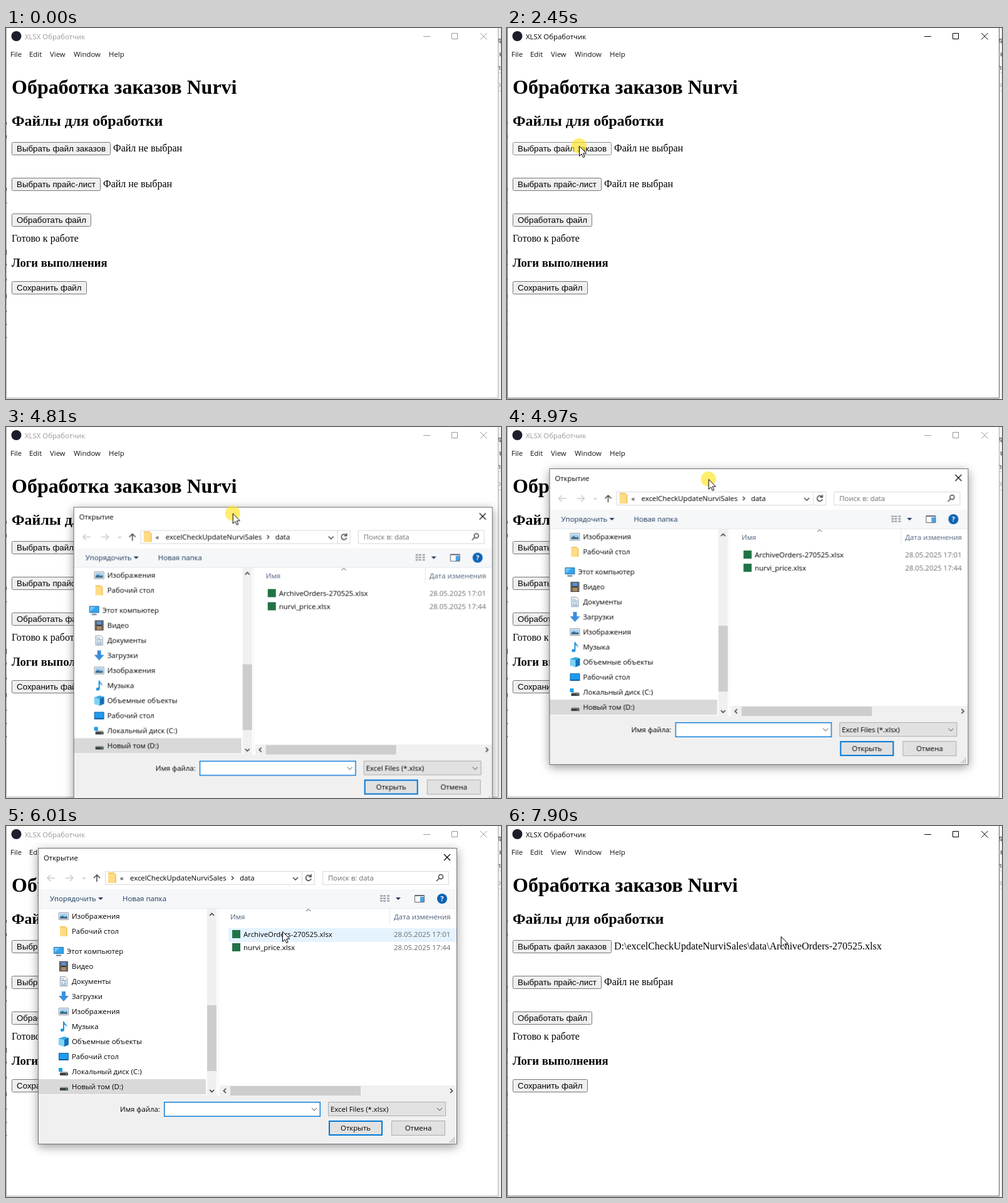
An HTML page for the animation above (8000 ms loop, 790x592 px).

```html
<!DOCTYPE html>
<html lang="ru">
<head>
<meta charset="utf-8">
<title>XLSX Обработчик</title>
<style>
html, body { margin: 0; width: 100%; height: 100%; overflow: hidden; background: #fff; }
svg { display: block; }
text { white-space: pre; }
.ui { font: 11.4px "Open Sans", "Noto Sans", sans-serif; }
.page { font: 16px "Liberation Serif", "Times New Roman", serif; }
.page .h1 { font-size: 32px; font-weight: bold; }
.page .h2 { font-size: 24px; font-weight: bold; }
.page .h3 { font-size: 18.72px; font-weight: bold; }
.btn text { font: 13.333px "Liberation Sans", Arial, sans-serif; }
.btn rect { fill: #efefef; stroke: #767676; }
.line { fill: none; stroke: #444; }
.mid { text-anchor: middle; }
.muted { fill: #6d6d6d; }

/* 8 s loop: 1% = 80 ms */
.title, .border, .hover, .chosen, .unchosen, .press, .row, .field, .name, .caret { animation: 8s step-end infinite; }
.title { animation-name: title; }
.border { animation-name: border; }
.btn .hover { animation-name: hover; }
.unchosen { animation-name: unchosen; }
.chosen { animation-name: chosen; }
.press { animation-name: press; }
.row { animation-name: row; }
.field { animation-name: field; }
.name { animation-name: name; }
.caret { animation-name: caret; }
.cursor { animation: cursor 8s linear infinite; }
.dialog { animation: drag 8s linear infinite; }
.fade { animation: close 8s linear infinite; transform-origin: 334px 236px; }

@keyframes title {
  0%, 32.125% { color: #999; }
  30.6%, 96.25%, 100% { color: #000; }
}
@keyframes border {
  0%, 32.125% { stroke: #aaa; }
  30.6%, 96.25%, 100% { stroke: #666; }
}
@keyframes hover {
  0%, 39.875%, 100% { fill: #efefef; stroke: #767676; }
  18.25%, 32.125% { fill: #e5e5e5; stroke: #4f4f4f; }
  30.6% { fill: #f5f5f5; stroke: #8d8d8d; }
}
@keyframes unchosen { 0% { opacity: 1; } 97.75%, 100% { opacity: 0; } }
@keyframes chosen { 0% { opacity: 0; } 97.75%, 100% { opacity: 1; } }
@keyframes press {
  0%, 32.125%, 68.5%, 82.25%, 84.875%, 100% { opacity: 0; }
  30.6%, 55.45%, 80.75%, 83.375% { opacity: .65; }
}
@keyframes row {
  0% { fill: #fff; stroke: #fff; }
  74.375% { fill: #e5f3ff; stroke: #e5f3ff; }
  80.75%, 100% { fill: #cce8ff; stroke: #99d1ff; }
}
@keyframes field { 0% { stroke: #0078d7; } 81.75%, 100% { stroke: #7a7a7a; } }
@keyframes name { 0% { opacity: 0; } 81.75%, 100% { opacity: 1; } }
@keyframes caret { 0%, 72.5%, 100% { opacity: 0; } 66.25% { opacity: 1; } }
@keyframes drag {
  0%, 55.6% { transform: translate(697px, 172px); animation-timing-function: cubic-bezier(.3, .4, .6, .9); }
  60.125% { transform: translate(108px, 128px); animation-timing-function: ease-out; }
  64.125%, 66.8% { transform: translate(49px, 38px); }
  68.5%, 100% { transform: translate(51px, 35px); }
}
@keyframes close {
  0% { opacity: 0; transform: none; animation-timing-function: step-end; }
  55.45%, 95% { opacity: 1; transform: none; }
  97.25%, 100% { opacity: 0; transform: scale(.93); }
}
@keyframes cursor {
  0%, 7.6% { transform: translate(830px, 545px); }
  8.125% { transform: translate(778px, 500px); }
  11.875% { transform: translate(522px, 250px); }
  13.75% { transform: translate(372px, 212px); animation-timing-function: ease-out; }
  17.75% { transform: translate(136px, 175px); animation-timing-function: ease-out; }
  20.875%, 39.375% { transform: translate(115px, 188px); }
  41% { transform: translate(676px, 199px); }
  41.5%, 55.6% { transform: translate(951px, 192px); animation-timing-function: cubic-bezier(.3, .4, .6, .9); }
  60.125% { transform: translate(362px, 138px); animation-timing-function: ease-out; }
  64.125%, 66.8% { transform: translate(303px, 58px); }
  68.5% { transform: translate(305px, 55px); animation-timing-function: ease-in-out; }
  75.125% { transform: translate(441px, 168px); }
  76.125% { transform: translate(437px, 174px); }
  77.625%, 100% { transform: translate(437px, 176px); }
}
</style>
</head>
<body>
<svg width="790" height="592" viewBox="0 0 790 592">
  <defs>
    <symbol id="pic" viewBox="0 0 16 16">
      <path d="M.5 2.5h15v11H.5z" fill="#fff" stroke="#8a9199"/>
      <path d="M2 4h12v8H2z" fill="#9fd0f2"/>
      <path d="M2 12V9l4-2 4 2 4-1v4z" fill="#3d6f8e"/>
    </symbol>
    <symbol id="folder" viewBox="0 0 16 16">
      <path d="M2 0h9l1 2h2v14H2z" fill="#f3c766"/>
      <path d="M2 2h10v14H2z" fill="#ffdc85"/>
    </symbol>
    <symbol id="pc" viewBox="0 0 16 16">
      <path d="M.5 1.5h15v10H.5z" fill="#35a5ee" stroke="#2b6da0"/>
      <path d="M1 11L10 2H1z" fill="#6cc4fa"/>
      <path d="M4 14.5h8" stroke="#5b7b94" stroke-width="2"/>
    </symbol>
    <symbol id="film" viewBox="0 0 16 16">
      <path d="M1 0h14v16H1z" fill="#333"/>
      <path d="M4 1h8v6H4z" fill="#5b8fd0"/>
      <path d="M4 9h8v6H4z" fill="#b08a5a"/>
      <path d="M2.5 1v15m11-15v15" stroke="#ddd" stroke-width="1.4" stroke-dasharray="1.5"/>
    </symbol>
    <symbol id="doc" viewBox="0 0 16 16">
      <path d="M2.5.5h8l3 3v12h-11z" fill="#fff" stroke="#8a9199"/>
      <path d="M4 4h5M4 6.500h8M4 9h3m1 0h4M4 11.500h3m1 0h4M4 13.500h8" stroke="#4b8cc2"/>
    </symbol>
    <symbol id="down" viewBox="0 0 16 16">
      <path d="M5 0h6v7h5l-8 9-8-9h5z" fill="#3c8fdc"/>
    </symbol>
    <symbol id="music" viewBox="0 0 16 16">
      <path d="M7 0h2c0 4 5 4 4 9-1-3-2-3-4-4v8c0 4-6 4-6 1s2-3 4-2.500z" fill="#1b94e4"/>
    </symbol>
    <symbol id="cube" viewBox="0 0 16 16">
      <path d="M0 3l9-3 7 2v11l-7 3-9-3z" fill="#35a8e0"/>
      <path d="M0 3l9 2v11l-9-3z" fill="#7fd3f5"/>
      <path d="M9 5l7-3v11l-7 3z" fill="#1272b8"/>
    </symbol>
    <symbol id="desk" viewBox="0 0 16 16">
      <path d="M.5 2.500h15v11H.5z" fill="#1e9bf0" stroke="#1565a5"/>
      <path d="M1 12.500h14" stroke="#0f568f"/>
    </symbol>
    <symbol id="disk" viewBox="0 0 16 16">
      <path d="M3 8h11l1 2H2z" fill="#aaa"/>
      <path d="M2 10h13v4H2z" fill="#3a3f44"/>
      <path d="M11 12h3" stroke="#7d7"/>
    </symbol>
    <symbol id="system" viewBox="0 0 16 16">
      <path d="M0 2h6v6H0z" fill="#18a0e8"/>
      <use href="#disk"/>
    </symbol>
  </defs>

  <!-- What shows behind the window -->
  <path d="M785 0h5v592H0v-2h785z" fill="#f1f1f1"/>
  <path d="M786 71.500h4m-4 29h4" stroke="#ccc"/>
  <g class="ui" fill="#333">
    <text x="784" y="23">де</text><text x="787" y="45">ь</text>
    <text x="783" y="67">ли</text><text x="783" y="94" fill="#999">ра</text>
  </g>

  <!-- Application window -->
  <path d="M0 0h785v590H0z" fill="#fff"/>
  <path class="border" d="M.5-1V590.500H785.500V-1" fill="none"/>
  <path d="M.5 150v4m0 17v5m0 79v5m0 18v2m0 74v8m0 14v3m0 21v3m0 22v6m0 20v2m0 19v2m0 19v2" stroke="#334"/>
  <circle cx="16.500" cy="13" r="8" fill="#1d1e2c"/>
  <g class="title ui">
    <text x="30" y="18" fill="currentColor">XLSX Обработчик</text>
    <path d="M666 13.500h11M711.500 8.500h9v9h-9zM757 8l10.500 10.500m0-10.500L757 18.500" fill="none" stroke="currentColor"/>
  </g>
  <g class="ui" fill="#111">
    <text x="7" y="46">File</text><text x="37" y="46">Edit</text><text x="70" y="46">View</text>
    <text x="108" y="46">Window</text><text x="164" y="46">Help</text>
  </g>
  <g class="page">
    <text class="h1" x="9" y="105">Обработка заказов Nurvi</text>
    <text class="h2" x="9" y="156">Файлы для обработки</text>
    <text class="unchosen" x="171" y="197">Файл не выбран</text>
    <text class="chosen" x="171" y="197">D:\excelCheckUpdateNurviSales\data\ArchiveOrders-270525.xlsx</text>
    <text x="155" y="254">Файл не выбран</text>
    <text x="9" y="341">Готово к работе</text>
    <text class="h3" x="9" y="381">Логи выполнения</text>
  </g>
  <g class="btn">
    <rect class="hover" x="9.500" y="182.500" width="157" height="20" rx="2"/><text x="17" y="197">Выбрать файл заказов</text>
    <rect x="9.500" y="239.500" width="141" height="20" rx="2"/><text x="17" y="254">Выбрать прайс-лист</text>
    <rect x="9.500" y="296.500" width="126" height="20" rx="2"/><text x="17" y="311">Обработать файл</text>
    <rect x="9.500" y="404.500" width="119" height="20" rx="2"/><text x="17" y="419">Сохранить файл</text>
  </g>

  <!-- File dialog -->
  <g class="dialog"><g class="fade ui">
    <rect x=".5" y=".5" width="668" height="472" fill="#fff" stroke="#707070" style="filter: drop-shadow(0 4px 8px rgba(0,0,0,.4))"/>
    <text x="9" y="20">Открытие</text>
    <path d="M648 10l10 10m0-10l-10 10" stroke="#000" stroke-width="1.200"/>

    <g class="line" stroke-width="1.500">
      <path d="M27 48H15m5-5l-5 5 5 5M44 48h12m-5-5l5 5-5 5M71 47l2.500 2.500L76 47" style="stroke: #ccc"/>
      <path d="M94 54V43m-5 5l5-5 5 5"/>
      <path d="M407 47l4 4 4-4M309 45l3 3-3 3"/>
      <path d="M435 45a4.300 4.300 0 1 0 1 4M436 42v4h-4"/>
      <circle cx="643" cy="46" r="3.500"/><path d="M640.500 48.500L636 53"/>
    </g>
    <g class="line" style="stroke: #d9d9d9">
      <path d="M107.500 37.500h334v21h-334zM421.500 38v20M454.500 37.500h201v21h-201z"/>
    </g>
    <use href="#folder" x="110" y="39" width="17" height="17"/>
    <text x="131" y="52">«</text>
    <text x="147" y="52">excelCheckUpdateNurviSales</text>
    <text x="322" y="52">data</text>
    <text class="muted" x="463" y="52">Поиск в: data</text>

    <path d="M1 66h667v30H1z" fill="#f5f7f9"/>
    <path d="M1 96.500h667" stroke="#e6eaee"/>
    <g fill="#1e395b">
      <text x="19" y="85">Упорядочить</text><text x="135" y="85">Новая папка</text>
      <path d="M96 79h8l-4 4zM571 79h8l-4 4z"/>
    </g>
    <path class="line" d="M546 76.500h4m1 0h4m2 0h4m-15 4h4m1 0h4m2 0h4m-15 4h4m1 0h4m2 0h4" stroke-width="2" style="stroke: #8d949c"/>
    <path d="M601.500 75.500h15v11h-15z" fill="#fff" stroke="#667"/>
    <path d="M602 76.500h14" stroke="#667"/>
    <path d="M610 78h6v8h-6z" fill="#4aa3e0"/>
    <circle cx="645" cy="81" r="8" fill="#0c62b5"/>
    <text class="mid" x="645" y="85" fill="#fff" font-weight="bold">?</text>

    <path d="M1 369h267v24H1z" fill="#d9d9d9"/>
    <g id="tree"></g>
    <path d="M270 97h15v297h-15zM290 379h378v17H290z" fill="#f0f0f0"/>
    <path d="M270 251h15v105h-15zM307 380h208v15H307z" fill="#cdcdcd"/>
    <path d="M287.500 97v297" stroke="#f0f0f0"/>
    <path class="line" d="M274 108l3.500-3.500L281 108m-7 278l3.500 3.500L281 386M300 384l-3.500 3.500L300 391m358-7l3.500 3.500L658 391" stroke-width="1.700"/>

    <path class="line" d="M428 101l3.500-3.500L435 101"/>
    <path d="M561.500 97v24" stroke="#e5e5e5"/>
    <g fill="#4c607a"><text x="307" y="114">Имя</text><text x="568" y="114">Дата изменения</text></g>
    <rect class="row" x="304.500" y="128.500" width="363" height="21"/>
    <path d="M310 131h13v13h-13zM310 152h13v13h-13z" fill="#217346"/>
    <text x="328" y="142">ArchiveOrders-270525.xlsx</text><text class="muted" x="568" y="142">28.05.2025 17:01</text>
    <text x="328" y="163">nurvi_price.xlsx</text><text class="muted" x="568" y="163">28.05.2025 17:44</text>

    <path d="M1 396h667v76H1zM1 394h286v3H1z" fill="#f0f0f0"/>
    <text x="131" y="421">Имя файла:</text>
    <rect class="field" x="201.700" y="405.700" width="248.600" height="22.600" fill="#fff" stroke-width="1.400"/>
    <text class="name" x="206" y="421">ArchiveOrders-270525.xlsx</text>
    <path class="caret" d="M205.500 410v14" stroke="#000"/>
    <path d="M463.500 405.500h187v22h-187zM564.500 435.500h85v23h-85z" fill="#e1e1e1" stroke="#adadad"/>
    <path d="M465 436h84v22h-84z" fill="#e1e1e1" stroke="#0078d7" stroke-width="2"/>
    <path class="line" d="M437 415l4 4 4-4M637 415l4 4 4-4"/>
    <text x="467" y="421">Excel Files (*.xlsx)</text>
    <text class="mid" x="507" y="451">Открыть</text><text class="mid" x="607" y="451">Отмена</text>
    <path d="M657 469h8m-5-3h5m-2-3h2" stroke="#b5b5b5" stroke-width="2" stroke-dasharray="2 1"/>
  </g></g>

  <g class="cursor">
    <circle class="press" r="12" fill="#ffe41e"/>
    <path d="M.5.5V16.500L4 13l2.500 5.500 2.500-1-2.400-5.500h5z" fill="#fff" stroke="#000"/>
  </g>
</svg>
<script>
const places = [
  ["pic", "Изображения"], ["folder", "Рабочий стол"], ["pc", "Этот компьютер"], ["film", "Видео"],
  ["doc", "Документы"], ["down", "Загрузки"], ["pic", "Изображения"], ["music", "Музыка"],
  ["cube", "Объемные объекты"], ["desk", "Рабочий стол"], ["system", "Локальный диск (C:)"], ["disk", "Новый том (D:)"]
];
document.getElementById("tree").innerHTML = places.map(([icon, label], i) => {
  const y = 109 + i * 24 + (i > 1 ? 8 : 0);
  const x = icon === "pc" ? 25 : 33;
  return `<use href="#${icon}" x="${x}" y="${y - 8}" width="16" height="16"/><text x="${x + 21}" y="${y + 4}">${label}</text>`;
}).join("");
</script>
</body>
</html>
```
